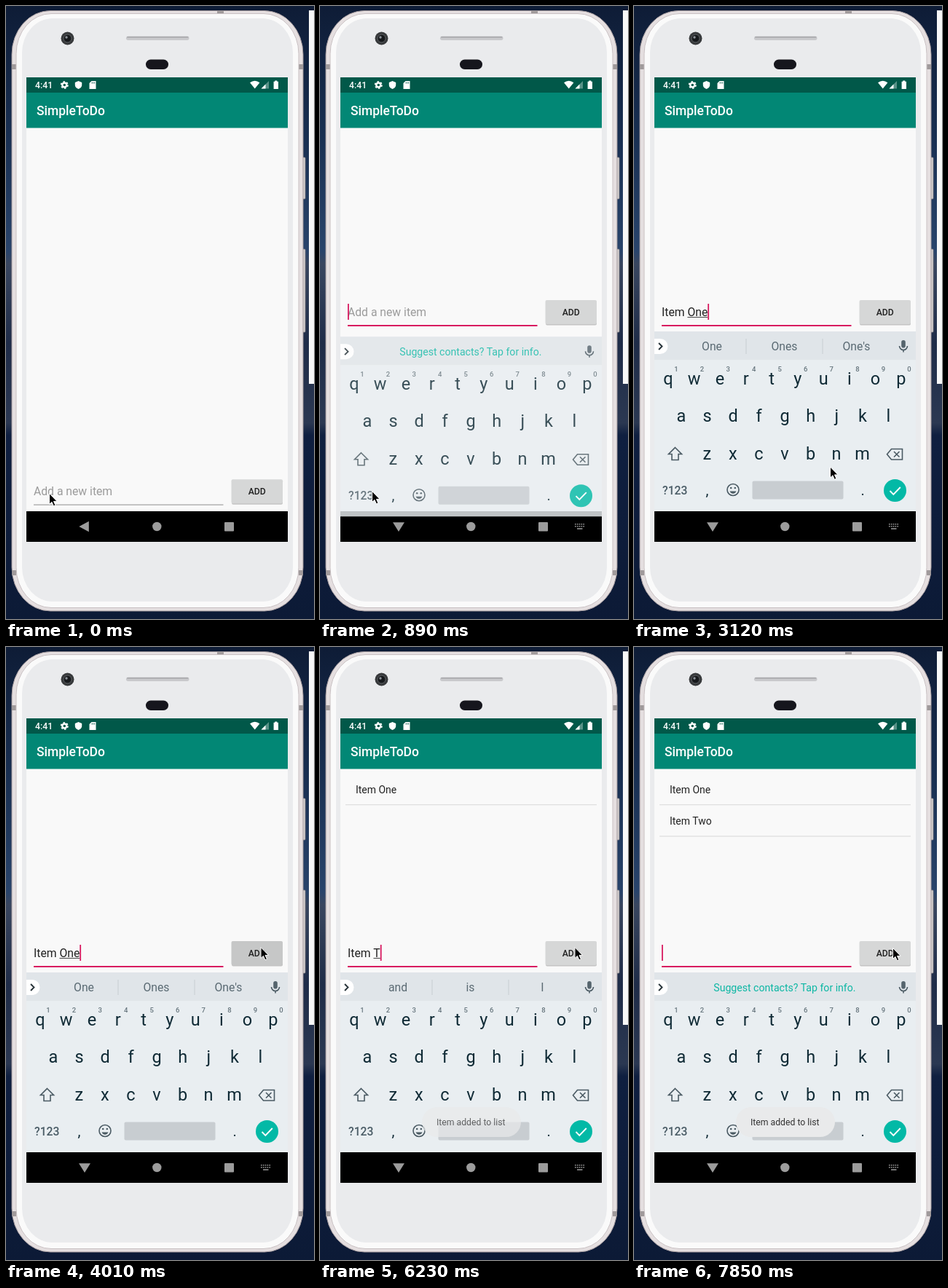
Recreate the animation shown at these times as an HTML page. Size 423 by 842 pixels, loop 7.99 s.

```html
<!DOCTYPE html>
<html lang="en">
<head>
<meta charset="utf-8">
<title>SimpleToDo</title>
<style>
  html, body { margin: 0; width: 100%; height: 100%; overflow: hidden; background: #0d1a36; }
  svg { display: block; font-family: Roboto, sans-serif; }
  text { white-space: pre; }
  .mid { text-anchor: middle; }
  .med { font-weight: 500; }
  .line { fill: none; stroke: #4a5a63; stroke-width: 1.6; }
</style>
</head>
<body>
<svg width="423" height="842" viewBox="0 0 423 842">
  <defs>
    <linearGradient id="sky" x2="0" y2="1">
      <stop offset="0" stop-color="#0e1c36"/>
      <stop offset=".2" stop-color="#182e50"/>
      <stop offset=".4" stop-color="#29446b"/>
      <stop offset=".42" stop-color="#39465f"/>
      <stop offset=".55" stop-color="#1f2c48"/>
      <stop offset=".68" stop-color="#2b3852"/>
      <stop offset=".7" stop-color="#0f1f40"/>
      <stop offset="1" stop-color="#0c1a36"/>
    </linearGradient>
    <clipPath id="screen"><rect x="28" y="98" width="359" height="638"/></clipPath>
  </defs>

  <rect width="423" height="842" fill="url(#sky)"/>
  <rect x="416" y="6" width="7" height="513" fill="#f8f8f8"/>

  <!-- phone body -->
  <g fill="#d5d0d0" stroke="#8f898b" stroke-width=".8">
    <rect x="405" y="208" width="6" height="57" rx="1"/>
    <rect x="405" y="334" width="6" height="114" rx="1"/>
  </g>
  <rect x="8" y="6.5" width="400" height="824.5" rx="53" ry="60" fill="#e5dfe0" stroke="#a79da0"/>
  <g fill="#a09a9b">
    <rect x="8" y="80" width="6" height="7"/><rect x="402" y="80" width="6" height="7"/>
    <rect x="8" y="775" width="6" height="7"/><rect x="402" y="775" width="6" height="7"/>
    <rect x="290" y="6.500" width="9" height="3.500"/>
  </g>
  <rect x="14" y="10.5" width="388" height="816" rx="48" ry="55" fill="#fafafa" stroke="#c9c1c3"/>
  <rect x="22" y="17" width="372" height="801" rx="42" ry="47" fill="#eaebed"/>
  <circle cx="84.5" cy="44.5" r="9" fill="#37393b"/>
  <circle cx="84.5" cy="44.5" r="5.5" fill="#17191c" stroke="#606366"/>
  <circle cx="83" cy="43" r="1.7" fill="#8d9399"/>
  <rect x="165" y="41.500" width="86.500" height="5.500" rx="2.700" fill="#c9c9cc"/>
  <rect x="166" y="42" width="84.500" height="1.500" rx=".7" fill="#a6a6aa"/>
  <rect x="192" y="73.500" width="31" height="13.500" rx="6.700" fill="#16161d"/>

  <g clip-path="url(#screen)">
    <rect x="28" y="98" width="359" height="638" fill="#f9f9f9"/>
    <rect x="28" y="119" width="359" height="48.500" fill="#028775"/>
    <rect x="28" y="98" width="359" height="21" fill="#015849"/>
    <text x="42" y="150" class="med" font-size="17.47" fill="#fff">SimpleToDo</text>

    <!-- status bar -->
    <g fill="#fff">
      <text x="40" y="113" class="med" font-size="12.23">4:41</text>
      <circle cx="80.300" cy="108.500" r="3" fill="none" stroke="#fff" stroke-width="2.400"/>
      <circle cx="80.300" cy="108.500" r="4.700" fill="none" stroke="#fff" stroke-width="1.600" stroke-dasharray="2.46"/>
      <path d="M99.500 103l4.700 2v3.500q0 3.700-4.700 5.500q-4.700-1.800-4.700-5.500V105z"/>
      <path d="M117.500 103h6v11h-9v-8z"/>
      <path d="M335 105.300q6.700-5 13.400 0l-6.700 8.200z"/>
      <path d="M361 103v10.500h-10.500z" opacity=".35"/>
      <path d="M356.500 107.500v6h-6z"/>
      <path d="M369.300 102.500h3v1.200h1.700V114h-6.400V103.700h1.700z"/>
    </g>
    <path d="M118 104.500v2m1.800-2v2m1.800-2v2" stroke="#015849" stroke-width=".8"/>

    <!-- list -->
    <g id="items" font-size="13.98" fill="#222"></g>

    <!-- entry row, drawn at its raised place -->
    <g id="row">
      <rect x="310" y="405" width="70" height="33.500" rx="2" fill="#c4c4c4"/>
      <rect id="button" x="309.500" y="404" width="70.500" height="33" rx="2"/>
      <text x="344.700" y="424.700" class="mid med" font-size="12.23" fill="#212121">ADD</text>
      <text id="hint" x="38" y="426" font-size="15.72" fill="#9b9b9b">Add a new item</text>
      <text id="entry" x="38" y="426" font-size="15.72" fill="#212121"></text>
      <rect id="composing" y="427" height="1" fill="#444"/>
      <rect id="caret" y="409" width="1.800" height="22" fill="#d81b60"/>
      <rect id="underline" x="38" width="260.500"/>
    </g>

    <rect x="28" y="694" width="359" height="42"/>

    <g id="board">
      <rect x="28" y="447" width="359" height="247" fill="#e9eef1"/>
      <rect x="28" y="447" width="359" height="39" fill="#e0e5e9"/>
      <path d="M28 457h8a10 10 0 0 1 0 21h-8z" fill="#fff"/>
      <path d="M34 463l4.500 4.500l-4.500 4.500" class="line" style="stroke:#263238;stroke-width:1.900"/>
      <text id="notice" x="109.300" y="472.500" font-size="14.1" fill="#0db7a4">Suggest contacts? Tap for info.</text>
      <g id="words" class="mid" font-size="15.72" fill="#5a6a73">
        <path d="M154 457v21M259 457v21" stroke="#c7cdd1"/>
        <text x="107" y="473"></text><text x="206.500" y="473"></text><text x="305.500" y="473"></text>
      </g>
      <rect x="367.200" y="459" width="5.600" height="10.500" rx="2.800" fill="#55646d"/>
      <path d="M364.500 467a5.500 5.500 0 0 0 11 0M370 472.500v3" class="line"/>
      <g id="keys" class="mid" font-size="23.5" fill="#0f2a35"></g>
      <path d="M56.500 606.500l9 9h-4.500v8h-9v-8h-4.500z" class="line"/>
      <path d="M353.500 608.500h15v14.500h-15l-6-7.250zM357 612l7.500 7.500m0-7.500l-7.500 7.500" class="line"/>
      <text x="39" y="670.500" class="med" font-size="15.7" fill="#4a5c66">?123</text>
      <text x="98.500" y="672" font-size="20" fill="#0f2a35">,</text>
      <text x="311.500" y="672" font-size="20" fill="#0f2a35">.</text>
      <circle cx="136" cy="664.500" r="8" class="line"/>
      <path d="M131.500 666.500a4.800 4.800 0 0 0 9 0z" fill="#4a5a63"/>
      <circle cx="133.200" cy="662" r="1.300" fill="#4a5a63"/><circle cx="138.800" cy="662" r="1.300" fill="#4a5a63"/>
      <rect x="162.500" y="652.500" width="125" height="25" rx="2" fill="#c8cdd1"/>
      <circle cx="358.500" cy="665.500" r="15.500" fill="#03b9a6"/>
      <path d="M351.500 666l4.800 4.800l9.500-9.800" class="line" style="stroke:#fff;stroke-width:1.900"/>
    </g>

    <!-- navigation -->
    <g fill="#9c9c9c">
      <path id="back" d="M100.300 715l13.500-7.300v14.600z"/>
      <path id="down" d="M100 709.300h16l-8 12.700z"/>
      <circle cx="207.300" cy="715" r="6.200"/>
      <rect x="300" y="709" width="13" height="12.500" rx="1"/>
      <g id="switch" stroke="#9c9c9c" stroke-width="1.500">
        <path d="M350 711.700h13M350 714.700h13" stroke-dasharray="1.600 1.250"/>
        <path d="M353 718h7.500"/>
      </g>
    </g>

    <g id="toast">
      <rect x="140" y="632" width="136" height="41" rx="20.500" fill="#e9eaeb"/>
      <text x="160" y="657" font-size="12.23" fill="#333">Item added to list</text>
    </g>
  </g>

  <path id="pointer" d="M0 0v15l3.400-3.200l2.500 5.500l2.500-1.100l-2.400-5.300h4.600z" fill="#000" stroke="#fff"/>
</svg>

<script>
const LOOP = 7990;
const $ = id => document.getElementById(id);
const pen = document.createElement('canvas').getContext('2d');
pen.font = '15.72px Roboto, sans-serif';
const widthOf = s => pen.measureText(s).width;

// Each track holds its latest value: [start, ...values]
const pointer = [
  [0, 59.5, 669.5], [150, 66, 668], [300, 71.5, 666.5],
  [2830, 74, 671], [2970, 160, 662], [3120, 269.5, 633], [3270, 355, 570],
  [3420, 407, 490], [3570, 380, 435], [3720, 350, 412.5],
  [6820, 352, 412.5], [6960, 354, 413], [7110, 355.5, 413.5]
];
const typing = [
  [0, ''], [1180, 'I'], [1780, 'It'], [1930, 'Ite'], [2080, 'Item'], [2380, 'Item '],
  [2680, 'Item O'], [2830, 'Item On'], [2970, 'Item One'], [4020, ''],
  [4750, 'I'], [5200, 'It'], [5350, 'Ite'], [5490, 'Item'], [5790, 'Item '],
  [6230, 'Item T'], [6380, 'Item Tw'], [6520, 'Item Two'], [7560, '']
];
const guesses = [
  [0, ''], [1930, 'It,Its,It\'s'], [2080, 'Item,Items,Item\'s'], [2380, 'and,is,I'],
  [2830, 'On,One,Only'], [3120, 'One,Ones,One\'s'], [4020, ''],
  [5200, 'It,Its,It\'s'], [5490, 'Item,Items,Item\'s'], [5790, 'and,is,I'],
  [6380, 'The,To,This'], [6670, 'Two,Twos,Two\'s'], [7560, '']
];
const board = [[0, 0, 0], [750, 28, .45], [890, 7.2, .82], [1040, 0, 1]]; // drop, opacity
const toast = [[0, 0], [4160, .45], [4310, 1], [6230, .72], [6380, .2], [6520, 0], [7700, .5], [7850, 1]];
const button = [
  [0, '#d6d7d7'], [3870, '#c6c7c7'], [4020, '#cbcccc'], [4310, '#d6d7d7'],
  [7410, '#c6c7c7'], [7560, '#cbcccc'], [7850, '#d6d7d7']
];
const added = [[4020, 'Item One'], [7560, 'Item Two']];

const at = (track, t) => track.findLast(k => k[0] <= t).slice(1);
const set = (id, attrs) => {
  for (const name in attrs) $(id).setAttribute(name, attrs[name]);
};
const show = (id, on) => set(id, { visibility: on ? 'visible' : 'hidden' });

const STEP = 35.55;
[['qwertyuiop', 47, 519.5], ['asdfghjkl', 65, 571], ['zxcvbnm', 100.3, 622.5]].forEach(([row, x0, y], r) =>
  [...row].forEach((key, i) => {
    const x = x0 + i * STEP;
    $('keys').innerHTML += `<text x="${x}" y="${y}">${key}</text>` + (r ? '' :
      `<text x="${x + 11}" y="502" class="med" font-size="9.5" fill="#66757d">${(i + 1) % 10}</text>`);
  }));

$('items').innerHTML = added.map(([, name], i) => `<g id="item${i}">
  <text x="49" y="${201 + 43 * i}">${name}</text>
  <rect x="35" y="${216 + 43.3 * i}" width="345" height="1.3" fill="#e0e0e0"/></g>`).join('');

function render(now) {
  const t = now % LOOP;
  const focused = t >= 600, open = t >= 750;

  const [x, y] = at(pointer, t);
  set('pointer', { transform: `translate(${x} ${y})` });

  const [text] = at(typing, t);
  const end = 38 + widthOf(text);
  const wordStart = 38 + widthOf(text.slice(0, text.lastIndexOf(' ') + 1));
  $('entry').textContent = text;
  show('hint', !text && t < 4000);
  set('caret', { x: end });
  show('caret', focused);
  set('composing', { x: wordStart, width: end - wordStart });
  set('underline', focused
    ? { y: 438, height: 2, fill: '#d81b60' }
    : { y: 438.3, height: 1, fill: '#8f8f8f' });
  set('row', { transform: `translate(0 ${open ? 0 : 246.3})` });
  set('button', { fill: at(button, t)[0] });

  const [drop, alpha] = at(board, t);
  set('board', { transform: `translate(0 ${drop})`, opacity: alpha });
  show('back', !open);
  show('down', open);
  show('switch', open);

  const [list] = at(guesses, t);
  const words = list.split(',');
  show('notice', !list);
  show('words', list);
  $('words').querySelectorAll('text').forEach((el, i) => el.textContent = words[i] || '');

  added.forEach(([start], i) => show('item' + i, t >= start));
  set('toast', { opacity: at(toast, t)[0] });
}

const begin = performance.now();
(function loop() {
  render(performance.now() - begin);
  requestAnimationFrame(loop);
})();
</script>
</body>
</html>
```
